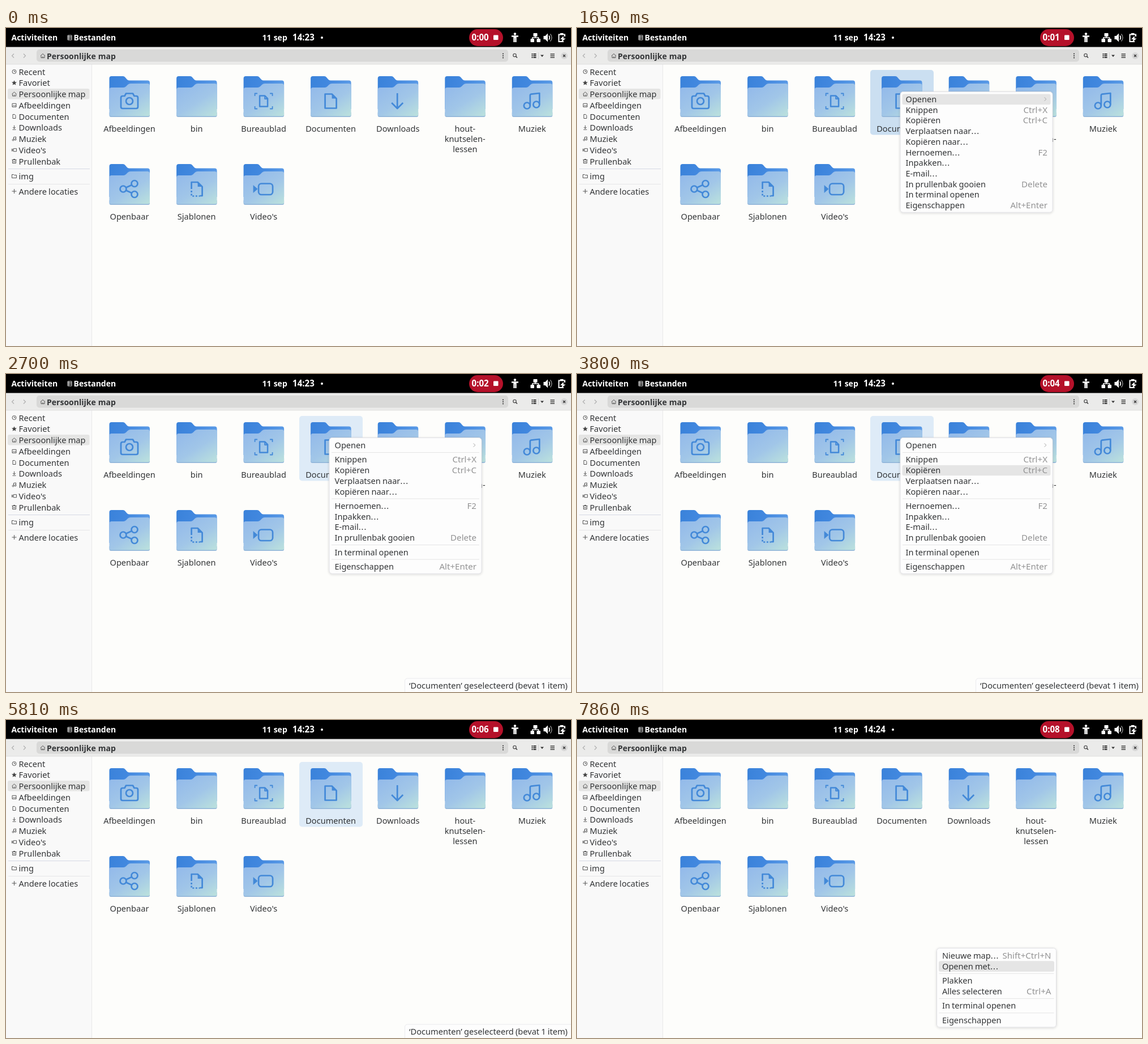
An HTML page that plays this animation: 998 by 561 pixels, repeating every 8 s.

```html
<!DOCTYPE html>
<html lang="nl">
<head>
<meta charset="utf-8">
<style>
html, body { margin: 0; width: 100%; height: 100%; overflow: hidden; background: #fdfdfb; }
svg { display: block; width: 100vw; height: 100vh; }
text { font: 14.6px "Noto Sans", sans-serif; fill: #333537; word-spacing: -.7px; white-space: pre; }
.b { font-weight: 700; font-size: 14px; word-spacing: .5px; }
.num { font-size: 15.1px; }
.w { fill: #fff; }
.key { fill: #929293; font-size: 15.1px; text-anchor: end; }
.mid { text-anchor: middle; }
.ico { fill: none; stroke: #4389d8; stroke-width: 2.7; stroke-linejoin: round; }
.small { fill: none; stroke: #555; stroke-width: 1; }
</style>
</head>
<body>
<svg viewBox="0 0 998 561" preserveAspectRatio="none">
  <defs>
    <linearGradient id="back" x1="0" x2="1" y1="0" y2=".1">
      <stop offset="0" stop-color="#3a82da"/><stop offset=".45" stop-color="#4288df"/><stop offset="1" stop-color="#5a9ae6"/>
    </linearGradient>
    <linearGradient id="front" x1=".1" y1="0" x2=".9" y2="1">
      <stop offset="0" stop-color="#92b9ea"/><stop offset=".55" stop-color="#a1c6e8"/><stop offset="1" stop-color="#b9dfde"/>
    </linearGradient>
    <filter id="shadow" x="-10%" y="-10%" width="120%" height="125%">
      <feDropShadow dx="0" dy="1" stdDeviation="2" flood-color="#223" flood-opacity=".16"/>
    </filter>
    <g id="folder">
      <path fill="url(#back)" d="M-35.500 -40q0-4 4-4h20q2.500 0 4 2l3 3.500q1.500 2 4 2h32.500q4 0 4 4V14h-71.500z"/>
      <path fill="#8fb3d8" d="M-35.500 20h71.500v5q0 3-3 3h-65.500q-3 0-3-3z"/>
      <path fill="url(#front)" d="M-35.500 -20q0-4 4-4h21q2.500 0 4.500-2l3-3q2-2 5-2h30q4 0 4 4V23.500q0 3-3 3h-65.500q-3 0-3-3z"/>
    </g>
  </defs>
  <g id="base"></g>
  <rect id="tile" x="518" y="74" width="112" height="114.500" rx="5"/>
  <g id="files"></g>
  <g id="status">
    <path d="M704.500 562V542q0-5 5-5H999V562z" fill="#fdfdfd" stroke="#ebebed"/>
    <text x="712" y="555">‘Documenten’ geselecteerd (bevat 1 item)</text>
  </g>
  <g id="menu"></g>
  <g id="bar"></g>
  <text id="clock" class="b w num" x="506" y="22"></text>
  <text id="timer" class="b w num" x="822.500" y="22"></text>
</svg>
<script>
const $ = id => document.getElementById(id);
const text = (x, y, s, cls = '') => `<text x="${x}" y="${y}" class="${cls}">${s}</text>`;
const rect = (x, y, w, h, fill, r = 0) => `<rect x="${x}" y="${y}" width="${w}" height="${h}" rx="${r}" fill="${fill}"/>`;
const path = (d, attrs = '') => `<path d="${d}" ${attrs}/>`;
const circle = (x, y, r, attrs = '') => `<circle cx="${x}" cy="${y}" r="${r}" ${attrs}/>`;
const at = (x, y, body, cls = '') => `<g transform="translate(${x} ${y})" class="${cls}">${body}</g>`;
const dark = 'fill="#444" stroke="none"';
const solid = 'fill="#4389d8" stroke="none"';

// Small symbolic icons, centred on 0,0
const home = path('M-4 0L0-3.500 4 0M-3 0V3.500H3V0M0 3.500V1');
const small = {
  recent: circle(0, 0, 3.5) + path('M0-2V0H2'),
  star: path('M0-4.500L1.300-1.400 4.500-1.200 2 .8 2.900 4 0 2.200-2.900 4-2 .8-4.500-1.200-1.300-1.400z', dark),
  home,
  image: path('M-3.500-3H3.500V3H-3.500zM-3 2L-1 0 .5 1.500 2 0 3 2'),
  doc: path('M-2.500-3.500H.8L2.500-1.500V3.500H-2.500z'),
  down: path('M0-4V1.500M-2.500-.8L0 1.700 2.500-.8M-3 3.500H3'),
  music: path('M-1 2V-3L3-3.500V1') + circle(-2, 2, 1.4) + circle(2, 1.2, 1.4),
  video: path('M-1.500-2.500H4V2.500H-1.500zM-4-2V2L-1.500 0z'),
  trash: path('M-4-2.500H4M-1.500-3.500H1.500M-3-2.500V3.500H3V-2.500M-1-.5V2M1-.5V2'),
  folder: path('M-4-3H-1L0-2H4V3H-4z'),
  plus: path('M-4 0H4M0-4V4')
};

const docPath = (w, h, c) => `M${-w}${-h}H${w - c}L${w} ${c - h}V${h}H${-w}z`;
const emblem = {
  camera: path('M-12-9H-8.500L-6-13.500H6L8.500-9H12Q15-9 15-6V10Q15 13 12 13H-12Q-15 13-15 10V-6Q-15-9-12-9z') + circle(0, 0, 6),
  desk: path(docPath(7, 9.5, 5), 'stroke-width="2.500"') + path('M2-10V-4H8', 'stroke-width="1.800"') +
    path('M-15.500-9V-13.500H-11M11-13.500H15.500V-9M15.500 9V13.500H11M-11 13.500H-15.500V9', 'stroke-width="1.800"'),
  doc: path(docPath(10, 12.5, 8)) + path('M2-12.500V-4.500H10z', solid),
  down: path('M-1-14V13M-11 3L-1 13 9 3'),
  music: circle(-9, 8, 5.5) + circle(7.5, 6, 5.5) + path('M-3.500 8V-10Q-3.500-12-1.500-12.300L13-14V6'),
  share: circle(-11, 0, 5.5) + circle(9, -9.5, 5.5) + circle(9, 9.5, 5.5) + path('M-6-2.500L4-7M-6 2.500L4 7'),
  template: path('M-9 0V-12H2L10-4V12H6') + path('M2-12V-4H10z', solid) +
    path('M-9 3V12.500H6', 'stroke-dasharray="3 2.600"'),
  video: `<rect x="-9" y="-9.500" width="25" height="19.500" rx="5"/>` + path('M-18.500-7L-10.500 0-18.500 7z', solid)
};

const places = [['Recent', 'recent'], ['Favoriet', 'star'], ['Persoonlijke map', 'home'], ['Afbeeldingen', 'image'],
  ['Documenten', 'doc'], ['Downloads', 'down'], ['Muziek', 'music'], ["Video's", 'video'], ['Prullenbak', 'trash']];
const place = ([name, icon], y) => at(14.5, y - .5, small[icon], 'small') + text(22.5, y + 5, name);

const files = [['Afbeeldingen', 'camera'], ['bin'], ['Bureaublad', 'desk'], ['Documenten', 'doc'], ['Downloads', 'down'],
  ['hout-|knutselen-|lessen'], ['Muziek', 'music'], ['Openbaar', 'share'], ['Sjablonen', 'template'], ["Video's", 'video']];

$('base').innerHTML =
  rect(0, 0, 998, 561, '#fdfdfb') +
  rect(0, 64, 151, 497, '#f9f9f9') + rect(151, 64, 1, 497, '#e8e8e8') +
  rect(0, 33, 998, 31, '#ebebea') + rect(0, 63.5, 998, 1, '#e0e0e0') +
  rect(54, 38, 833, 21.5, '#d9d9d8', 5) +
  at(65, 49, home, 'small') + text(72, 54.5, 'Persoonlijke map', 'b') +
  path('M14 45.500L10.500 49 14 52.500M31 45.500L34.500 49 31 52.500', 'fill="none" stroke="#b0b0b0" stroke-width="1.200"') +
  [45.5, 49, 52.5].map(y => circle(878, y, 1.1, 'fill="#333"')).join('') +
  circle(898.5, 48, 2.7, 'class="small" style="stroke-width:1.300"') + path('M900.500 50L903 52.500', 'stroke="#333" stroke-width="1.500"') +
  [46, 49, 52].map(y => rect(928.5, y - 1, 2, 2, '#333') + rect(931.5, y - 1, 5, 2, '#333') + rect(961.5, y - .7, 7.5, 1.4, '#333')).join('') +
  rect(940, 43, 1, 12, '#d2d2d2') + path('M944 47.500H950L947 51z', 'fill="#333"') +
  circle(986, 49, 6, 'fill="#d8d8d8"') + path('M984 47L988 51M988 47L984 51', 'stroke="#333" stroke-width="1.300"') +
  rect(3, 107, 144.5, 18.5, '#e5e5e4', 3) +
  places.map((p, i) => place(p, 77.5 + 19.75 * i)).join('') +
  rect(4, 248, 144, 1, '#d6d9e4') + place(['img', 'folder'], 262) +
  rect(4, 275, 144, 1, '#e6e6e8') + place(['Andere locaties', 'plus'], 288.5);

$('files').innerHTML = files.map(([name, icon], i) => {
  const x = 218 + 118.55 * (i % 7), y = 129 + 155 * Math.floor(i / 7);
  const label = name.split('|').map((s, k) => text(0, 53.5 + 18.4 * k, s, 'mid')).join('');
  return at(x.toFixed(1), y, '<use href="#folder"/>' + (icon ? `<g class="ico">${emblem[icon]}</g>` : '') + label);
}).join('');

$('bar').innerHTML =
  rect(0, 0, 998, 33.5, '#000') +
  text(9.5, 22, 'Activiteiten', 'b w') + text(119.5, 22, 'Bestanden', 'b w') +
  path('M109 13H116V21H109zM109 15.500H116M109 18H116M111 13V21', 'fill="none" stroke="#ddd"') +
  text(452.5, 22, '11 sep', 'b w') + circle(558, 17, 2, 'fill="#fff"') +
  rect(818, 2, 60, 30, '#b5112a', 15) + rect(861, 12.5, 8.5, 8.5, '#fff', 1) +
  circle(899, 10.5, 2.2, 'fill="#fff"') +
  path('M893 14.500H905M899 14V18M897.500 15V25M900.500 15V25', 'stroke="#fff" stroke-width="2.400" fill="none"') +
  rect(931.5, 9, 7, 6, '#fff', 1) + rect(926.5, 19, 6.5, 6, '#fff', 1) + rect(937.5, 19, 6.5, 6, '#fff', 1) +
  path('M935 14V17M929.700 20V17H940.700V20', 'fill="none" stroke="#fff" stroke-width="1.500"') +
  path('M949.500 14H952.500L957 9.500V24.500L952.500 20H949.500z', 'fill="#fff"') +
  path('M959 13.500Q961.500 17 959 20.500', 'fill="none" stroke="#fff" stroke-width="1.700"') +
  path('M961.500 10.500Q966.500 17 961.500 23.500', 'fill="none" stroke="#888" stroke-width="1.500"') +
  path('M985 24H976.500V11.500H987V15', 'fill="none" stroke="#fff" stroke-width="2"') +
  rect(979, 9, 5.5, 3, '#fff') + path('M984.500 14L979 20H982.500L981 25 988.500 18.500H985z', 'fill="#fff"');

// Menu rows: label, shortcut; '-' is a separator
const fileMenu = { x: 571, y: 112, w: 269, rows: [['Openen', '>'], '-', ['Knippen', 'Ctrl+X'], ['Kopiëren', 'Ctrl+C'],
  ['Verplaatsen naar…'], ['Kopiëren naar…'], '-', ['Hernoemen…', 'F2'], ['Inpakken…'], ['E-mail…'],
  ['In prullenbak gooien', 'Delete'], '-', ['In terminal openen'], '-', ['Eigenschappen', 'Alt+Enter']] };
const emptyMenu = { x: 635.5, y: 402, w: 211, rows: [['Nieuwe map…', 'Shift+Ctrl+N'], ['Openen met…'], '-', ['Plakken'],
  ['Alles selecteren', 'Ctrl+A'], '-', ['In terminal openen'], '-', ['Eigenschappen']] };

function drawMenu({ x, y, w, rows }, hover, compact, alpha) {
  let cy = y + 14, body = '';
  for (const row of rows) {
    if (row === '-') {
      if (!compact) {
        body += rect(x + 4, cy - 6.7, w - 8, 1, '#e4e4e5');
        cy += 6.75;
      }
      continue;
    }
    const [label, key] = row;
    if (label === hover) body += rect(x + 3.5, cy - 9.5, w - 7, 18.7, '#e5e5e5', 3);
    // The ellipsis is set a little wider than the font's own
    body += text(x + 9.5, cy + 5, label.replace('…', '<tspan letter-spacing="1">...</tspan>'));
    if (key === '>') body += path(`M${x + 254.5} ${cy - 3.5}l3.500 3-3.500 3`, 'fill="none" stroke="#aaa"');
    else if (key) body += text(x + w - 9, cy + 5, key, 'key');
    cy += 18.7;
  }
  const box = `<rect x="${x}" y="${y + .5}" width="${w}" height="${cy - y - 7}" rx="5" fill="#fdfdfd" stroke="#e0e0e4" filter="url(#shadow)"/>`;
  return `<g opacity="${alpha}">${box}${body}</g>`;
}

const DUR = 8000;
const ticks = [810, 1800, 2700, 3800, 4800, 5810, 6810, 7810];
// Value of the last step that has begun
const step = (t, steps) => steps.reduce((v, [from, to]) => t >= from ? to : v, '');
const ramp = (t, a, b) => Math.min(1, Math.max(0, (t - a) / (b - a)));
const hovers = [[1580, 'Openen'], [1700, ''], [2460, 'Openen'], [2700, ''], [2770, 'Knippen'], [2850, 'Kopiëren'],
  [6460, 'Nieuwe map…'], [6560, ''], [7700, 'Nieuwe map…'], [7780, 'Openen met…']];
ticks[2] = 2770;

function menuAt(t) {
  const hover = step(t, hovers);
  if (t >= 1580 && t < 4140) return drawMenu(fileMenu, hover, t < 1680, t < 1610 ? .5 : t < 4110 ? 1 : .5);
  if (t >= 6460) return drawMenu(emptyMenu, hover, t < 6530, t < 6490 ? .5 : 1);
  return '';
}

function tileAt(t) {
  if (t < 1580 || t >= 6660) return ['none', 0];
  const fade = t < 4110 ? ramp(t, 1680, 1860) : t < 5370 ? 0 : 1;
  const mix = (a, b) => Math.round(a + (b - a) * fade);
  return [`rgb(${mix(203, 222)},${mix(223, 235)},${mix(241, 247)})`, 1 - ramp(t, 6460, 6660)];
}

let lastMenu = null;
function render(t) {
  $('timer').textContent = '0:0' + ticks.filter(s => t >= s).length;
  $('clock').textContent = t < 6810 ? '14:23' : '14:24';
  const [fill, alpha] = tileAt(t);
  $('tile').setAttribute('fill', fill);
  $('tile').setAttribute('opacity', alpha);
  $('status').setAttribute('visibility', t >= 1680 && t < 6460 ? 'visible' : 'hidden');
  const menu = menuAt(t);
  if (menu !== lastMenu) $('menu').innerHTML = lastMenu = menu;
}

const start = performance.now();
function loop() {
  render((performance.now() - start) % DUR);
  requestAnimationFrame(loop);
}
loop();
</script>
</body>
</html>
```
